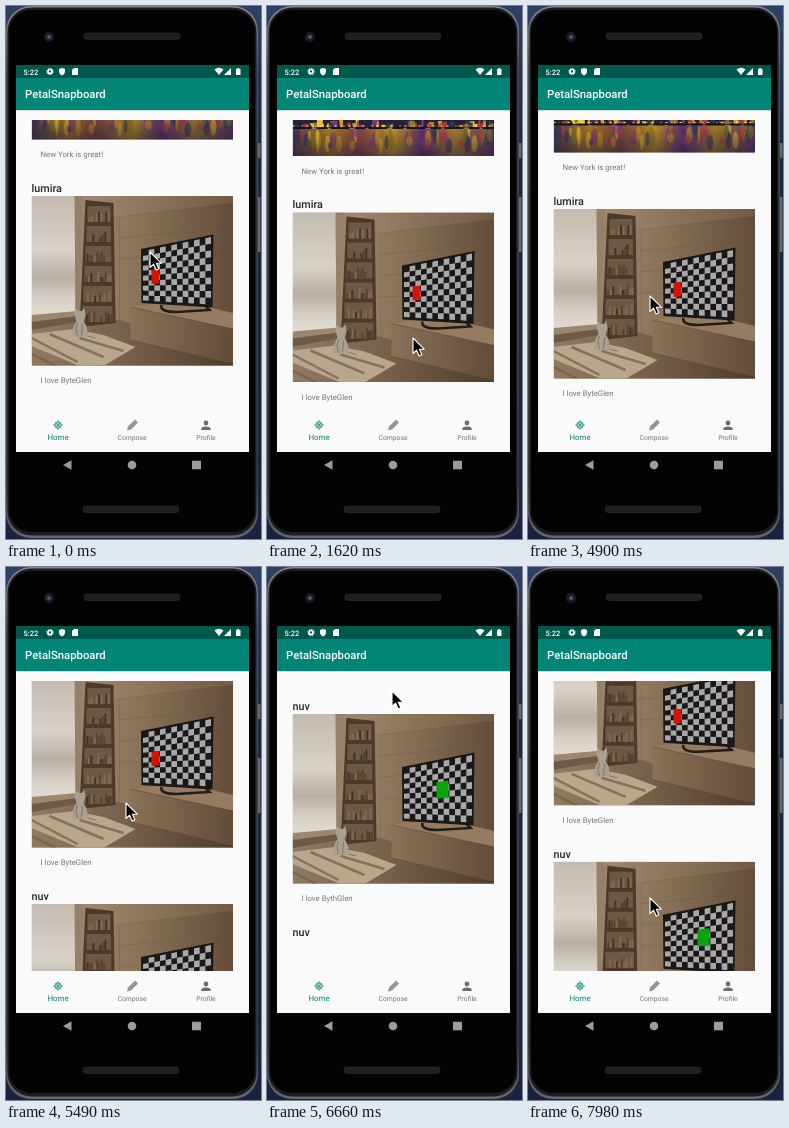
An HTML page for the animation above (8000 ms loop, 255 by 533 pixels).

```html
<!DOCTYPE html>
<html lang="en">
<head>
<meta charset="utf-8">
<title>Photo feed</title>
<style>
  html, body { margin: 0; width: 100%; height: 100%; overflow: hidden; background: #17243d; }
  svg { display: block; width: 100%; height: 100%; }
  text { font-family: Roboto, sans-serif; text-rendering: geometricPrecision; }
  .user { font-size: 10.8px; font-weight: 500; fill: #262626; }
  .caption { font-size: 7.8px; fill: #777; }
  .tab { font-size: 6.8px; fill: #757575; text-anchor: middle; }
</style>
</head>
<body>
<svg viewBox="0 0 255 533">
  <defs>
    <linearGradient id="backdrop" x2="0" y2="1"><stop stop-color="#2c4165"/><stop offset=".3" stop-color="#1a2740"/><stop offset="1" stop-color="#18233f"/></linearGradient>
    <linearGradient id="rim" x2="0" y2="1"><stop stop-color="#85888d"/><stop offset=".12" stop-color="#4b4d51"/><stop offset=".9" stop-color="#3c3e42"/><stop offset="1" stop-color="#66696e"/></linearGradient>
    <linearGradient id="wall"><stop stop-color="#a8937a"/><stop offset=".5" stop-color="#8d755b"/><stop offset="1" stop-color="#634d3a"/></linearGradient>
    <linearGradient id="ceiling"><stop stop-color="#a28b70"/><stop offset="1" stop-color="#725b44"/></linearGradient>
    <linearGradient id="window" x2="0" y2="1"><stop stop-color="#c3bbb0"/><stop offset=".45" stop-color="#d8d2c9"/><stop offset=".68" stop-color="#b8afa3"/><stop offset=".85" stop-color="#d6cfc5"/><stop offset="1" stop-color="#e2dcd2"/></linearGradient>
    <linearGradient id="floor"><stop stop-color="#8f7a62"/><stop offset=".5" stop-color="#745e48"/><stop offset="1" stop-color="#4d3b2d"/></linearGradient>
    <linearGradient id="cabinet"><stop stop-color="#8a7158"/><stop offset="1" stop-color="#624b38"/></linearGradient>
    <linearGradient id="water"><stop stop-color="#4b3752"/><stop offset=".18" stop-color="#a4781f"/><stop offset=".33" stop-color="#7b4440"/><stop offset=".5" stop-color="#c0921f"/><stop offset=".64" stop-color="#5b3171"/><stop offset=".8" stop-color="#a77a2c"/><stop offset="1" stop-color="#573069"/></linearGradient>
    <linearGradient id="dusk" x2="0" y2="1"><stop stop-color="#1c1830" stop-opacity="0"/><stop offset="1" stop-color="#1c1830" stop-opacity=".55"/></linearGradient>
    <filter id="soft"><feGaussianBlur stdDeviation=".7"/></filter>
    <clipPath id="listArea"><path d="M25.5 114H227V404H25.5Z"/></clipPath>
    <clipPath id="photoArea"><path d="M0 0H201.5V169.5H0Z"/></clipPath>
    <g id="room" clip-path="url(#photoArea)">
      <path fill="url(#wall)" d="M0 0H202V170H0Z"/>
      <path fill="url(#ceiling)" d="M44 0H202V7L86 21Z"/>
      <path fill="none" stroke="#5f4a36" stroke-width=".5" opacity=".45" d="M86 21L202 7M86 42L202 31M86 63L202 56M86 84H202M88 21V126"/>
      <path fill="url(#floor)" d="M0 121L88 124L202 158V170H0Z"/>
      <g filter="url(#soft)">
        <path fill="#b8a68d" d="M0 138L42 133L72 139L104 151L72 170H48L0 150Z"/>
        <path fill="none" stroke="#715d48" stroke-width="2.5" opacity=".7" d="M0 142L46 166M18 138L72 161M0 158L24 170M48 142L92 155"/>
      </g>
      <path fill="url(#window)" d="M0 0H44V116L0 120Z"/>
      <path fill="#958069" d="M43 0H51L48 124H44Z"/>
      <path fill="#9b876f" d="M0 119L46 115V120L0 126Z"/>
      <path fill="#6f5a46" d="M0 126L46 120V126L0 134Z"/>
      <g id="shelf"></g>
      <path fill="#957c61" d="M99 111L147 104L202 117V133Z"/>
      <path fill="url(#cabinet)" d="M99 111L202 133V168L99 144Z"/>
      <path fill="none" stroke="#584532" stroke-width=".5" d="M99 111L202 133M99 144L202 168"/>
      <path fill="none" stroke="#211d1b" stroke-width="2.5" d="M130 109Q128 116 145 116L178 114L174 110"/>
      <path fill="#191817" d="M109.5 53L182 38.5L181 111.5L110 107Z"/>
      <g id="screen"></g>
      <path fill="#aaa091" d="M43 118L44 112L47 115H50L53 112L54 119Q53 123 52 125Q57 132 56 141H41Q40 132 45 125Z"/>
      <path fill="none" stroke="#817465" stroke-width="1" d="M46 127Q43 133 46 140M51 128L50 140M56 140L64 142"/>
    </g>
    <g id="city" clip-path="url(#photoArea)">
      <path fill="#252238" d="M0 130H202V142H0Z"/>
      <path fill="url(#water)" d="M0 142H202V170H0Z"/>
      <g id="lights"></g>
      <path fill="url(#dusk)" d="M0 142H202V170H0Z"/>
    </g>
  </defs>

  <!-- phone -->
  <path fill="url(#backdrop)" d="M0 0H255V533H0Z"/>
  <path fill="#656a73" d="M251 137H254.5V152H251ZM251 191H254.5V246H251Z"/>
  <rect x="0" y="0" width="252" height="532" rx="25" fill="url(#rim)"/>
  <rect x="1.5" y="1.5" width="249" height="528" rx="24" fill="#1c1d20"/>
  <rect x="3" y="4" width="246" height="522" rx="22" fill="#030303"/>
  <circle cx="43" cy="31" r="5" fill="#1c1b22"/><circle cx="43" cy="31" r="2" fill="#57508a"/>
  <g fill="#211e1b" stroke="#3a332a" stroke-width=".5">
    <rect x="78" y="27" width="96" height="6.5" rx="3"/><rect x="77" y="500" width="96" height="6.5" rx="3"/>
  </g>
  <path fill="#fafafa" d="M10 104H243V446H10Z"/>
  <path fill="#00574b" d="M10 59H243V72H10Z"/>
  <path fill="#008577" d="M10 72H243V104H10Z"/>
  <path fill="#d0dddb" d="M10 104H243V105H10Z"/>

  <!-- status and title -->
  <g fill="#fff">
    <text x="17.5" y="68.5" font-size="7.5" font-weight="500">5:22</text>
    <circle cx="44" cy="65.5" r="2" fill="none" stroke="#fff" stroke-width="1.7"/>
    <circle cx="44" cy="65.5" r="3.2" fill="none" stroke="#fff" stroke-width="1" stroke-dasharray="1.2 1.3"/>
    <path d="M53 63L56 62L59 63V65Q59 68 56 69.5Q53 68 53 65ZM66 64L68 62H72V69H66Z"/>
    <path d="M208.5 63.5Q213 60 217.5 63.5L213 69ZM225 62V69H218ZM230 63H231.2V62H233.2V63H234.5V69H230Z"/>
    <text x="19" y="92.3" font-size="11.3" font-weight="500">PetalSnapboard</text>
  </g>

  <g clip-path="url(#listArea)"><g id="feed"></g></g>

  <!-- tabs and navigation -->
  <g fill="none" stroke="#2b9786"><circle cx="52" cy="419" r="3.2" stroke-width="1"/><path stroke-width=".8" d="M52 414V424M47 419H57M49.5 416.5L54.5 421.5M54.5 416.5L49.5 421.5"/></g>
  <path fill="#959595" d="M121 424.5L122 420.5L129 413.5L132 416.5L125 423.5Z"/>
  <g fill="#6c6c6c"><circle cx="200" cy="417" r="2.4"/><path d="M195.3 424V422.6Q196 420.4 200 420.4T204.7 422.6V424Z"/></g>
  <text class="tab" x="52" y="434" style="font-size:7.9px;fill:#008577">Home</text>
  <text class="tab" x="126" y="434">Compose</text>
  <text class="tab" x="200" y="434">Profile</text>
  <path fill="#9c9c9c" d="M57 459L65.5 454.3V463.7ZM186 454.8H195V463.3H186Z"/>
  <circle cx="126" cy="459" r="4.3" fill="#9c9c9c"/>

  <path id="cursor" fill="#000" stroke="#fff" stroke-width="1.1" stroke-linejoin="round" d="M0 0V15.5L3.6 12.2L6.2 18L8.8 16.8L6.3 11.2H11.2Z"/>
</svg>
<script>
const $ = id => document.getElementById(id);
const LOOP = 8000, STEP = 148, PITCH = 226;

let seed = 7;
const random = () => (seed = seed * 16807 % 2147483647) / 2147483647;
const pick = list => list[Math.floor(random() * list.length)];
const mix = (a, b, u) => a + (b - a) * u;

// Leaning bookshelf: frame, boards and books
let shelf = '<path fill="#4b3a2b" d="M54 4L82 7L84 127L48 131Z"/>';
for (let row = 0; row < 6; row++) {
  const y = 10 + row * 20, left = 56 - row, right = 79 + row * .4;
  shelf += `<path fill="#6d5844" d="M${left} ${y}H${right}V${y + 16}H${left}Z"/>`;
  for (let x = left + 1; x < right - 2; x += 2.4) {
    const height = 5 + random() * 6, shade = pick(['#43342a', '#58452f', '#80694f']);
    if (random() < .75) shelf += `<path fill="${shade}" d="M${x} ${y + 16}v${-height}h2v${height}Z"/>`;
  }
}
$('shelf').innerHTML = shelf;

// Checkerboard on the television, in perspective
const COLS = 12, ROWS = 10;
const onScreen = (col, row) => {
  const u = col / COLS, v = row / ROWS;
  return [mix(111.5, 179.5, u), mix(mix(55, 41, u), mix(104.5, 108.5, u), v)].join(' ');
};
let cells = '';
for (let r = 0; r < ROWS; r++)
  for (let c = (r + 1) % 2; c < COLS; c += 2)
    cells += `M${onScreen(c, r)}L${onScreen(c + 1, r)}L${onScreen(c + 1, r + 1)}L${onScreen(c, r + 1)}Z`;
$('screen').innerHTML = `<path fill="#a8a8aa" d="${cells}"/>`;

// City lights along the shore and their soft reflections
let skyline = '', reflections = '';
for (let i = 0; i < 60; i++) {
  const x = random() * 201, hue = pick(['#f0c22c', '#d99a1c', '#7d3a80', '#b03c3c', '#303558', '#8a7a1e']);
  skyline += `<path fill="${hue}" d="M${x} ${133 + random() * 6}h${1 + random() * 5}V141h-3Z"/>`;
  reflections += `<ellipse cx="${x}" cy="${146 + random() * 14}" rx="${1 + random() * 3}" ry="${3 + random() * 7}" fill="${hue}" opacity=".6"/>`;
}
$('lights').innerHTML = `<g filter="url(#soft)">${skyline}${reflections}</g>
  <path stroke="#15141f" stroke-width="2" stroke-dasharray="19 5 11 3" d="M0 141.5H202"/>
  <path stroke="#ffe680" stroke-width="1.2" stroke-dasharray="2 7 1 4" d="M0 139.5H202"/>`;

const post = (index, user, photo, caption, patch = '') => `
  <g transform="translate(25.5 ${index * PITCH})">
    <text class="user" x="0" y="-4.3">${user}</text>
    <use href="#${photo}"/>${patch}
    <text class="caption" x="9" y="187.3">${caption}</text>
  </g>`;
const red = '<path fill="#d41408" d="M120 74L128 73V87.5L120 88Z"/>';
const green = '<path fill="#08a508" d="M144 68L156 66.5V84L144 84.5Z"/>';
$('feed').innerHTML =
  post(-1, '', 'city', 'New York is great!') +
  post(0, 'lumira', 'room', 'I love ByteGlen', red) +
  post(1, 'nuv', 'room', 'I love BythGlen', green) +
  `<g id="latePost">${post(2, '', 'room', 'I love BythGlen', green)}</g>` +
  `<text class="user" x="25.5" y="${2 * PITCH - 4.3}">nuv</text>`;

const scroll = [[3, 190], [4, 196], [5, 196], [6, 203], [7, 206.5], [32, 206.5], [33, 203], [36, 122],
  [37, 111], [38, 111], [41, 10], [43, -45], [45, -79], [46, -80], [48, -80], [50, -180], [54, 68.8]];
const pointer = [[3, 144, 246], [7, 145, 267], [9, 145, 267], [11, 146, 332], [12, 146, 354], [16, 131, 206],
  [19, 131, 206], [21, 121, 335], [32, 121, 335], [33, 122, 290], [37, 120, 236], [38, 120, 236],
  [42, 125, 124], [45, 125, 124], [46, 125, 127], [47, 124, 194], [48, 124, 194], [50, 123, 82], [54, 122, 331]];

function at(keys, step) {
  const next = keys.findIndex(key => key[0] >= step);
  if (next < 1) return keys.at(next).slice(1);
  const a = keys[next - 1], b = keys[next], u = (step - a[0]) / (b[0] - a[0]);
  return a.slice(1).map((value, i) => mix(value, b[i + 1], u));
}

function draw() {
  const step = Math.floor((performance.now() % LOOP + 13) / STEP);
  $('feed').setAttribute('transform', `translate(0 ${at(scroll, step)})`);
  $('cursor').setAttribute('transform', `translate(${at(pointer, step)})`);
  $('latePost').setAttribute('visibility', step > 45 ? 'visible' : 'hidden');
  requestAnimationFrame(draw);
}
draw();
</script>
</body>
</html>
```
